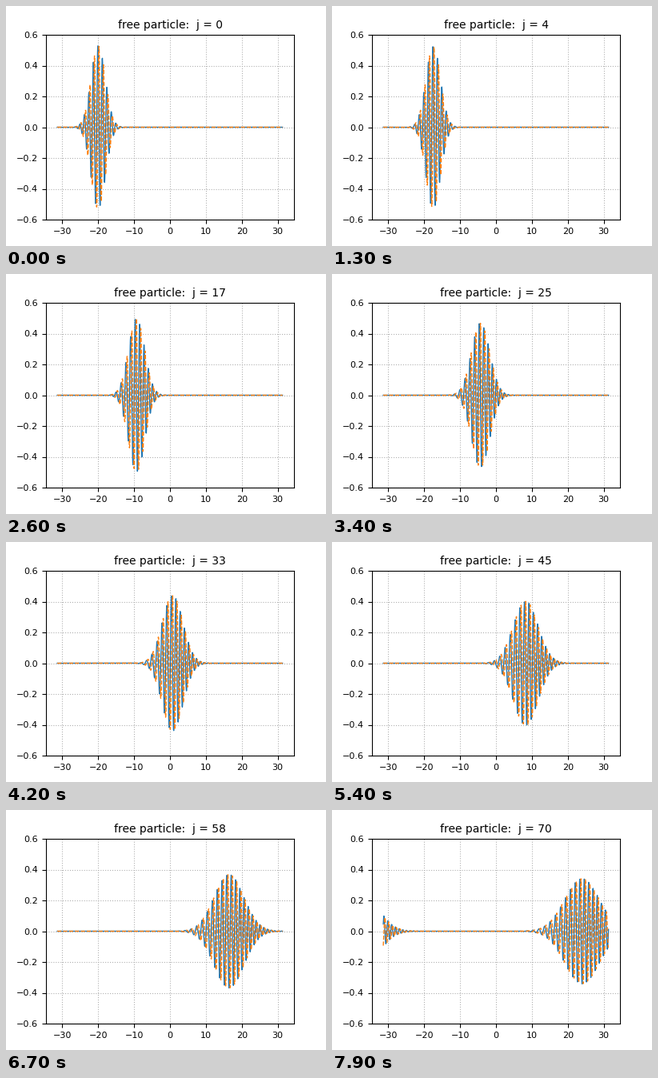
Recreate the animation shown at these times as a matplotlib script. Size 400x300 px, loop 8000 ms.

```python
import numpy as np
import matplotlib.pyplot as plt
from matplotlib.animation import FuncAnimation

plt.rcParams["font.family"] = "DejaVu Sans"

FRAMES = 80
INTERVAL = 100      # ms
HOLD = 9            # frames at rest before the packet starts to move

HALF = 10 * np.pi   # half width of the periodic domain
K0 = 5              # mean wave number
X0 = -20            # initial centre
S = 2               # initial width
DT = 2 * np.pi / 50

x = np.linspace(-HALF, HALF, 1024, endpoint=False)


def packet(x, t):
    """Spreading Gaussian packet of a free particle (hbar = m = 1)."""
    spread = 1 + 1j * t / S**2
    envelope = np.exp(-(x - X0 - K0 * t) ** 2 / (2 * S**2 * spread))
    norm = (np.pi * S**2) ** -0.25 / np.sqrt(spread)
    return norm * envelope * np.exp(1j * (K0 * x - K0**2 * t / 2))


def psi(t):
    """Packet on the ring: sum of its periodic images."""
    return sum(packet(x + 2 * HALF * n, t) for n in (-1, 0, 1))


fig, ax = plt.subplots(figsize=(4, 3), dpi=100)
fig.subplots_adjust(left=0.125, right=0.9, bottom=0.11, top=0.88)
ax.set_xlim(-1.1 * HALF, 1.1 * HALF)
ax.set_ylim(-0.6, 0.6)
ax.set_xticks(range(-30, 31, 10))
ax.set_yticks(np.linspace(-0.6, 0.6, 7))
ax.yaxis.set_major_formatter("{x:.1f}".format)
ax.yaxis.set_major_formatter(lambda v, _: f"{v + 0.0:.1f}".replace("-0.0", "0.0").replace("-", "\u2212"))
ax.tick_params(labelsize=8)
ax.grid(linestyle=":")

real, = ax.plot(x, 0 * x, lw=1)
imag, = ax.plot(x, 0 * x, "--", lw=1)
title = ax.set_title("", fontsize=10)


def update(frame):
    j = max(0, frame - HOLD)
    wave = psi(j * DT)
    real.set_ydata(wave.real)
    imag.set_ydata(wave.imag)
    title.set_text(f"free particle:  j = {j}")
    return real, imag, title


anim = FuncAnimation(fig, update, frames=FRAMES, interval=INTERVAL,
                     repeat=True, repeat_delay=0, blit=False)
plt.show()
```
